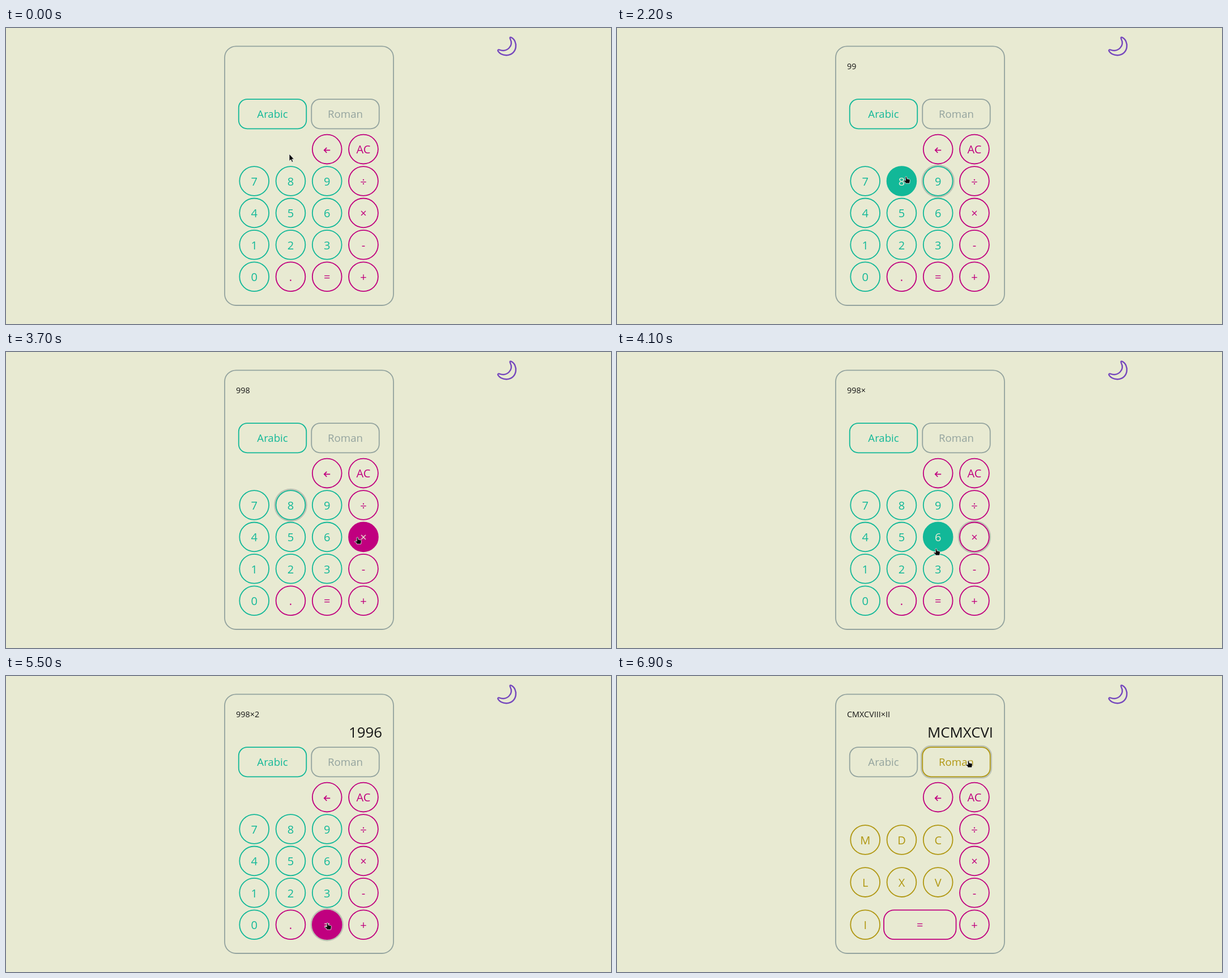
Animation of 1068 by 524 pixels, one loop 8000 ms. Source, as an HTML page:

```html
<!DOCTYPE html>
<html lang="en">
<head>
<meta charset="utf-8">
<title>Numeral calculator</title>
<style>
  html, body { margin: 0; width: 100%; height: 100%; overflow: hidden; background: #e8ead2; }
  svg { display: block; width: 1068px; height: 524px; font-family: "Open Sans", "Noto Sans", sans-serif; }
  .box { fill: none; stroke: currentColor; stroke-width: 1.8; }
  .ring { fill: none; stroke: #7f8b88; stroke-opacity: .42; stroke-width: 2.6; visibility: hidden; }
  .key text { fill: currentColor; font-size: 20px; text-anchor: middle; }
  .key .arrow { fill: none; stroke: currentColor; stroke-width: 1.7; }
  .key.tab text { font-size: 18.6px; }
  .num { color: #12b898; }
  .op { color: #c0007f; }
  .rom { color: #b09711; }
  .off { color: #93a39e; }
  .hover .box { fill: currentColor; }
  .hover text { fill: #e8ead2; }
  .hover .arrow { stroke: #e8ead2; }
  .focus .ring { visibility: visible; }
  #line { font-size: 14.4px; fill: #161616; }
  #total { font-size: 25.8px; fill: #161616; text-anchor: end; }
  .cursor { fill: #080808; stroke: #f4f4f4; stroke-width: .8; stroke-linejoin: round; }
</style>
</head>
<body>
<svg viewBox="0 0 1068 524">
  <rect x="386" y="32.3" width="298" height="458.7" rx="20" fill="none" stroke="#93a39e" stroke-width="1.8"/>
  <path fill="none" stroke="#7547bd" stroke-width="2.4" stroke-linejoin="round"
    d="M891.6 16.7C904 22 904 47 883.5 48.2C876.500 48.300 871.500 45.500 868.700 41.200C867.500 39 869 37.800 871 38.700C884.500 43.500 896.500 32 890 19C889 16.500 890 16 891.600 16.700Z"/>
  <text id="line" x="406" y="73"></text>
  <text id="total" x="664" y="108.600"></text>
  <g id="tabs"></g>
  <g id="ops"></g>
  <g id="arabic"></g>
  <g id="roman"></g>
  <g id="pointer" class="cursor">
    <path id="arrow" d="M0 0V12.500L2.800 10L4.800 14.500L6.800 13.600L4.900 9.200H8.500Z"/>
    <path id="hand" d="M-1 .6Q0-.6 1.300.3L2 4L6 4.600Q7.500 5 7.300 7L6.500 12H-.8L-1.300 9.700L-4.300 8.200Q-4.600 6.600-2.800 6.600L-.6 7Z"/>
  </g>
</svg>
<script>
const NS = "http://www.w3.org/2000/svg";
const $ = id => document.getElementById(id);
const LOOP = 8000;
const COL = i => 438.2 + 64.25 * i;
const ROW = i => 214.6 + 56.4 * i;
const keys = {};

function add(parent, tag, attrs, text) {
  const el = document.createElementNS(NS, tag);
  for (const k in attrs) el.setAttribute(k, attrs[k]);
  if (text) el.textContent = text;
  return parent.appendChild(el);
}

function addKey(group, id, label, type, x, y, w = 51.8, h = 51.8, r = 26) {
  const el = add($(group), "g", { class: "key " + type });
  const rect = (cls, grow) => add(el, "rect", {
    class: cls, x: x - w / 2 - grow, y: y - h / 2 - grow,
    width: w + 2 * grow, height: h + 2 * grow, rx: r + grow
  });
  rect("ring", 2);
  rect("box", 0);
  if (label === "←") add(el, "path", { class: "arrow", d: `M${x + 5.5} ${y + 1.7}h-10.500m4.500-4.500l-4.500 4.500l4.500 4.500` });
  else add(el, "text", { x, y: y + (type.includes("tab") ? 7.2 : 7.8) }, label);
  keys[id] = { el, group, x, y, w, h };
}

addKey("tabs", "Arabic", "Arabic", "tab num", 470.5, 152.2, 119.5, 52.2, 15);
addKey("tabs", "Roman", "Roman", "tab off", 599, 152.2, 119.5, 52.2, 15);
addKey("ops", "←", "←", "op", COL(2), ROW(0));
["AC", "÷", "×", "-", "+"].forEach((s, i) => addKey("ops", s, s, "op", COL(3), ROW(i)));
[..."789456123"].forEach((s, i) => addKey("arabic", s, s, "num", COL(i % 3), ROW(1 + Math.floor(i / 3))));
[..."0.="].forEach((s, i) => addKey("arabic", s, s, i ? "op" : "num", COL(i), ROW(4)));
[..."MDCLXVI"].forEach((s, i) => addKey("roman", s, s, "rom", COL(i % 3), 290 + 75.1 * Math.floor(i / 3)));
addKey("roman", "wide=", "=", "op", 534.8, ROW(4), 127.5, 51.8, 18);

// Pointer stops: time, x, y
const path = [
  [0, 500, 223], [500, 512, 230], [600, 535, 246], [700, 553, 262], [800, 560, 270],
  [2100, 534, 265], [2200, 510, 263], [2400, 512, 265], [2500, 514, 266],
  [3200, 514, 266], [3300, 552, 288], [3400, 597, 318],
  [3600, 612, 325], [3700, 620, 328], [4000, 598, 338], [4100, 563, 348],
  [4200, 541, 366], [4300, 522, 380], [4400, 515, 386],
  [4900, 522, 388], [5000, 532, 390], [5100, 549, 412], [5200, 562, 430], [5300, 567, 437],
  [6200, 580, 420], [6300, 600, 325], [6400, 618, 212], [6500, 620, 150]
];
const focus = [[0, ""], [1200, "9"], [2600, "8"], [3800, "×"], [4500, "2"], [5400, "="], [6700, "Roman"]];
const line = [[0, ""], [1300, "9"], [1900, "99"], [2700, "998"], [3900, "998×"], [4600, "998×2"], [6900, "CMXCVIII×II"]];
const total = [[0, ""], [5500, "1996"], [6900, "MCMXCVI"]];

const at = (list, t) => list.filter(s => s[0] <= t).pop();

function inside(k, x, y) {
  const dx = Math.abs(x - k.x), dy = Math.abs(y - k.y);
  return k.w === k.h ? Math.hypot(dx, dy) < 26.8 : dx < k.w / 2 && dy < k.h / 2;
}

function draw(now) {
  const t = now % LOOP;
  const [, x, y] = at(path, t);
  const roman = t >= 6900;
  const focused = at(focus, t)[1];
  let onKey = false;

  $("arabic").style.display = roman ? "none" : "";
  $("roman").style.display = roman ? "" : "none";
  keys.Arabic.el.setAttribute("class", "key tab " + (roman ? "off" : "num"));
  keys.Roman.el.setAttribute("class", "key tab " + (roman ? "rom" : "off"));

  for (const id in keys) {
    const k = keys[id];
    const hidden = k.group === (roman ? "arabic" : "roman");
    const over = !hidden && inside(k, x, y);
    onKey = onKey || over;
    k.el.classList.toggle("hover", over && k.group !== "tabs");
    k.el.classList.toggle("focus", id === focused);
  }

  $("line").textContent = at(line, t)[1];
  $("total").textContent = at(total, t)[1];
  $("pointer").setAttribute("transform", `translate(${x} ${y})`);
  $("arrow").style.display = onKey ? "none" : "";
  $("hand").style.display = onKey ? "" : "none";
}

const start = performance.now();
function tick() {
  draw(performance.now() - start);
  requestAnimationFrame(tick);
}
tick();
</script>
</body>
</html>
```
